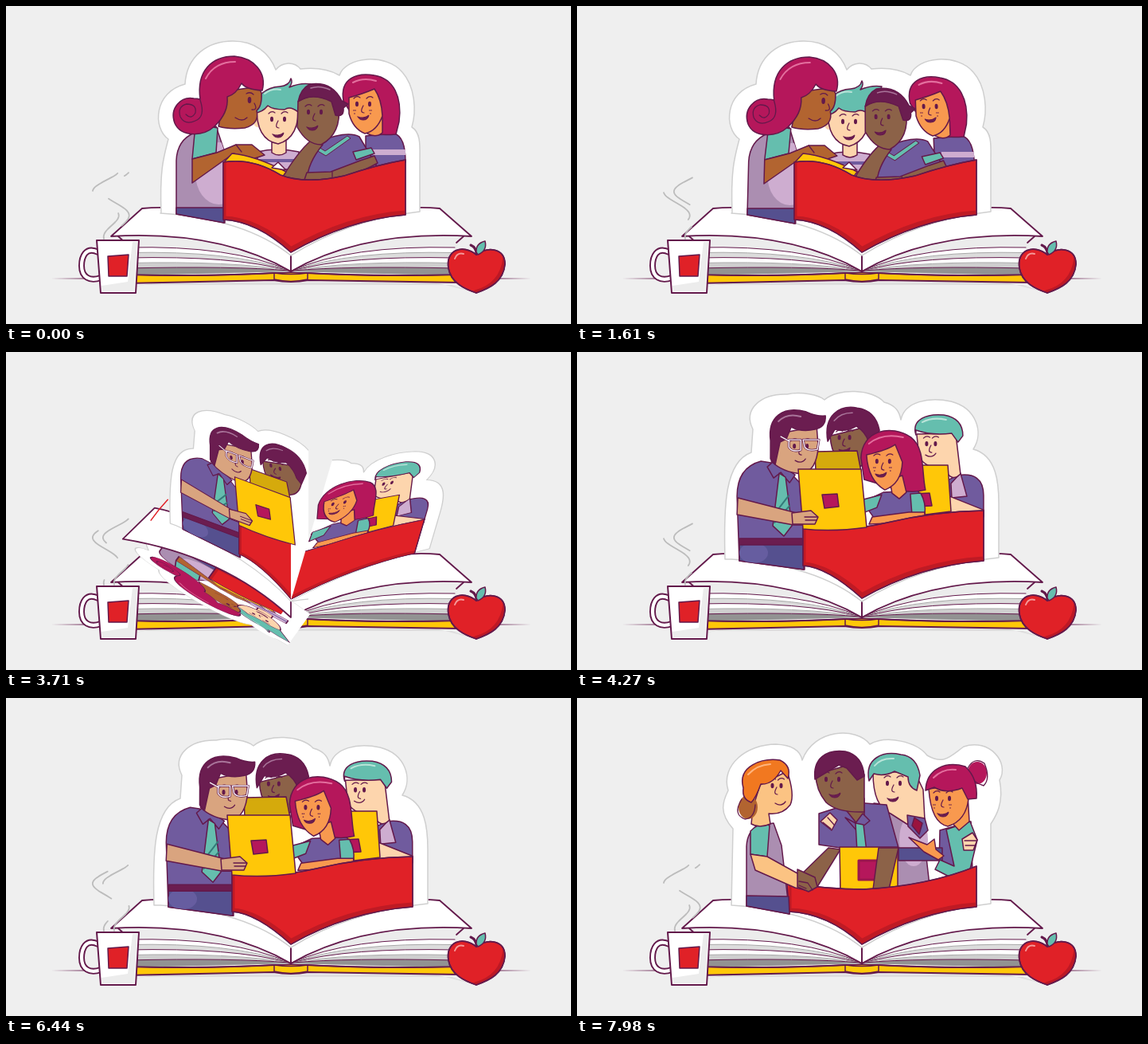
An HTML page with a canvas for the animation above (8000 ms loop, 710 by 399 pixels).

```html
<!DOCTYPE html>
<html lang="en">
<head>
<meta charset="utf-8">
<title>Pop-up book</title>
<style>
html, body { margin: 0; width: 100%; height: 100%; overflow: hidden; background: #efefef; }
canvas { display: block; width: 710px; height: 399px; }
</style>
</head>
<body>
<canvas id="stage" width="710" height="399"></canvas>
<script>
const ctx = document.getElementById('stage').getContext('2d');
const INK = '#63194b', PINK = '#b5175b', PLUM = '#6b1d50', TEAL = '#65beae', PURPLE = '#705b9e',
  INDIGO = '#55508f', LILAC = '#ceadd0', MAUVE = '#ab8eb1', RED = '#e02127', YELLOW = '#ffc708',
  BROWN = '#b26430', DARK = '#8c6248', PEACH = '#fdd5ad', ORANGE = '#f8994f', TAN = '#d9a47f';
const SPINE = [358, 312], LOOP = 8000, SCENE = 4000, TURN = 3150, TURN_KEYS = [0, 270, 560, 760];
let sway = 0, side = null;

ctx.lineJoin = ctx.lineCap = 'round';

function shape(d, fill, line = INK, width = 1.5) {
  const path = new Path2D(d);
  if (fill) { ctx.fillStyle = fill; ctx.fill(path); }
  if (line) { ctx.strokeStyle = line; ctx.lineWidth = width; ctx.stroke(path); }
}
const stroke = (d, color = INK, width = 1.3) => shape(d, null, color, width);

function dot(x, y, rx, ry = rx, color = INK) {
  ctx.fillStyle = color;
  ctx.beginPath();
  ctx.ellipse(x, y, rx, ry, 0, 0, 7);
  ctx.fill();
}

function inside(d, draw) {
  ctx.save();
  ctx.clip(new Path2D(d));
  draw();
  ctx.restore();
}

// While the pop-up folds, paper stops at the spine, but figures overhang it.
function creased(overlap, draw) {
  if (!side) draw();
  else inside(side === 'Left' ? `M0 0H${358 + overlap}V399H0Z` : 'M358 0H710V399H358Z', draw);
}

// A figure leans from its foot and dips as the sway grows.
function figure(owner, lean, dip, draw) {
  if (side && side !== owner) return;
  ctx.save();
  ctx.transform(1, 0, -lean * sway, 1, lean * sway * 260, dip * sway);
  draw();
  ctx.restore();
}

// x, y lies midway between the eyes.
function face(x, y, { gap = 16, mouth = 21, shift = 0, open = true, freckles = false } = {}) {
  for (const dir of [-1, 1]) {
    const ex = x + dir * gap / 2;
    dot(ex, y, 2, 3.2);
    stroke(`M${ex - 4} ${y - 7}q4 -4 8 -1`, INK, 1.2);
    if (freckles) for (let i = 0; i < 3; i++) dot(ex + dir * (i + 1) - 1, y + 8 + i % 2 * 4, .8);
  }
  stroke(`M${x} ${y + 2}q-5 9 1 9`, INK, 1.2);
  const mx = x + shift, my = y + mouth;
  if (open) shape(`M${mx - 7} ${my - 2}q7 3 14 -2q-1 6 -7 6q-5 0 -7 -4`, PLUM, INK, 1);
  else stroke(`M${mx - 7} ${my}q8 5 13 -2`);
}

function pocket(top, left, right) {
  const d = `${top}V262Q430 268 358 309Q315 270 ${left} 268Z`;
  creased(0, () => {
    shape(d, RED);
    inside(d, () => {
      stroke(`M${left} 268Q315 269 358 307Q430 266 ${right} 261`, '#bf1a24', 9);
      stroke(`M${left + 2} 190V270`, '#bf1a24', 3);
    });
    stroke(d);
  });
}

const cutout = d => creased(25, () => shape(d + 'V258Q430 268 358 313Q300 267 194 260Z', '#fff', '#cfcfcf', 1.5));

function family() {
  cutout('M195 260C193 205 198 190 204 167C184 153 186 108 225 98C227 63 253 44 285 44C313 44 331 59 339 80C347 70 362 69 370 79C389 77 407 80 419 87C427 63 478 59 498 83C514 101 516 131 510 152C522 159 520 178 520 195');
  figure('Left', 0, 3, () => {
    shape('M316 183Q340 177 368 183V205H316Z', LILAC);
    shape('M334 164H352V184Q343 190 334 184Z', PEACH);
    stroke('M318 194H366', PURPLE, 4);
    dot(316, 145, 5, 7, PEACH);
    shape('M315 126Q314 168 342 173Q370 165 367 123Z', PEACH);
    face(342, 142);
    shape('M312 134C311 111 329 102 344 101Q356 100 358 91Q361 96 356 102Q370 96 383 98L367 133Q357 125 350 130Q335 130 329 125Q322 134 312 134Z', TEAL);
    stroke('M325 110Q334 103 345 105', '#b9e4d9', 2);
  });
  figure('Right', -.04, 3, () => {
    shape('M452 163L488 160Q502 164 502 196L452 208Z', PURPLE);
    shape('M461 180H502V187H461Z', LILAC, null);
    shape('M424 119C419 90 442 83 463 87C487 91 498 114 494 145L490 161Q468 163 448 158Z', PINK);
    shape('M450 145L473 140V159Q465 166 454 160Z', ORANGE);
    shape('M431 115Q449 110 463 104Q472 117 473 138Q466 157 451 160Q436 154 431 135Z', ORANGE);
    face(449, 123, { mouth: 18, freckles: true });
    stroke('M436 96Q449 89 465 94', '#e36f9e', 2);
  });
  figure('Right', -.035, 6, () => {
    shape('M374 185L393 170Q429 156 444 164L466 201Q415 224 361 216Z', PURPLE);
    shape('M388 174L401 182L429 163L433 166L402 188L385 178Z', TEAL, INK, 1);
    shape('M436 183L459 178L463 185L440 193Z', TEAL);
    shape('M348 214Q367 183 383 169L398 174Q379 197 378 219Z', DARK);
    shape('M378 209L408 208L445 194L463 188L467 197Q428 220 375 218Z', DARK);
    stroke('M410 208V219');
    shape('M367 120Q383 109 408 114L418 125Q422 160 396 174Q378 174 366 152Z', DARK);
    face(388, 133, { shift: -3 });
    shape('M382 98Q410 94 422 119L430 123L424 128Q425 140 414 137L409 120Q385 108 367 120Q370 104 382 98Z', PLUM);
    stroke('M383 103Q394 99 407 105', '#a9759a', 1.5);
  });
  figure('Left', .026, 1, () => {
    const body = 'M214 261V194Q215 168 237 159L264 151L275 184V272Z';
    shape(body, MAUVE);
    inside(body, () => dot(267, 210, 29, 39, LILAC));
    shape('M214 253H274V272L214 261Z', INDIGO);
    shape('M237 160Q250 149 266 153L264 184L234 192Z', TEAL);
    shape('M234 192L265 184L289 174H309L325 187L310 192L286 185L234 222Z', BROWN);
    stroke('M289 174L296 183');
    shape('M267 151L276 107L317 101L321 109Q322 126 315 131Q319 148 300 153Q280 155 267 151Z', BROWN);
    dot(306, 118, 2.3, 4);
    stroke('M302 110q5 -3 9 1M312 122q5 9 -3 8M288 140q9 6 15 0');
    shape('M244 117C239 81 259 63 287 63C312 65 328 84 322 106Q302 105 296 97Q289 111 278 114Q280 134 262 151C248 164 220 165 212 147C205 128 220 113 236 116Q240 116 244 117Z', PINK);
    stroke('M244 118Q251 139 238 144Q225 150 219 139Q215 126 227 123Q240 123 238 134Q233 143 226 136');
    stroke('M251 91Q262 70 288 70', '#e36f9e', 2);
  });
  figure('Left', 0, 0, () => {
    shape('M284 185Q314 188 352 208L347 215Q310 196 274 196Z', YELLOW);
    shape('M334 203L342 196L352 206Z', '#fff');
  });
  pocket('M273 196Q309 190 345 212Q375 224 425 213Q467 199 502 193', 273, 502);
}

function classroom() {
  cutout('M186 260C184 192 186 138 219 126L221 97C208 71 232 52 264 53C282 49 304 54 311 60C328 45 371 46 386 63C401 67 405 75 407 85C412 62 442 56 470 62C501 70 512 100 498 122C528 130 530 166 530 190');
  figure('Left', .008, 2, () => {
    shape('M318 105L366 93L373 117Q370 142 347 146Q320 140 318 105Z', DARK);
    face(336, 107, { gap: 13, mouth: 17 });
    shape('M315 112C309 79 330 66 352 70Q375 73 380 98L373 119L366 112Q363 101 351 93Q337 101 324 97Z', PLUM);
    stroke('M323 86Q331 76 346 76', '#a9759a', 1.5);
  });
  figure('Right', -.01, 1, () => {
    shape('M441 174L477 155Q511 149 511 180V207H437Z', PURPLE);
    shape('M470 165L482 152L490 181L471 183Z', LILAC);
    shape('M438 187L466 180L511 198V206H438Z', PEACH);
    shape('M427 103L476 102L482 153Q471 164 463 148Q439 146 430 132Z', PEACH);
    face(445, 115, { gap: 11, mouth: 14, open: false });
    shape('M426 104C420 84 440 77 461 79Q485 83 485 105L479 113L471 102Q445 105 426 98Z', TEAL);
    stroke('M434 88Q447 81 464 85', '#b9e4d9', 2);
  });
  figure('Right', 0, 0, () => {
    shape('M414 148L434 142H466L470 200L414 207Z', YELLOW);
    shape('M421 178L443 177L446 193L424 194Z', PINK);
  });
  figure('Left', 0, 0, () => shape('M299 125L352 124L357 150H300Z', '#d5aa0c'));
  figure('Left', .012, 1, () => {
    const shirt = 'M204 262L201 181Q201 145 231 137L257 141L286 170V273Z';
    shape(shirt, PURPLE);
    shape('M204 239H285V273L204 262Z', INDIGO);
    inside(shirt, () => dot(222, 252, 18, 13, '#665da0'));
    shape('M204 234H285V242H204Z', PLUM);
    shape('M239 144L248 136L274 154L267 164L256 151L247 158Z', PURPLE);
    shape('M254 152L262 157L270 218L260 231L246 218Z', TEAL);
    stroke('M249 202L266 180M248 214L267 193', '#347a79', 2);
    shape('M202 183L276 202L294 198Q306 208 301 217H272L201 204Z', TAN);
    shape('M246 104L301 93L303 119Q301 148 283 153Q258 151 244 137Z', TAN);
    face(281, 118, { gap: 16, mouth: 18, open: false });
    shape('M243 111C239 81 259 67 288 75Q301 81 312 80Q313 94 299 97Q282 101 269 94L263 109L255 113L249 141L243 134Z', PLUM);
    const glasses = 'M266 110H281V123Q270 126 266 119ZM284 110H304L302 122Q290 125 286 119ZM256 106L267 112';
    stroke(glasses, INK, 2.8);
    stroke(glasses, '#f5eef3', 1.4);
    stroke('M253 87Q264 76 281 81', '#a9759a', 2);
  });
  figure('Right', -.016, 1, () => {
    shape('M359 188L385 176L428 174Q438 184 437 211L379 216Z', PURPLE);
    shape('M360 185L383 179L377 195L359 202Z', TEAL);
    shape('M419 178L432 177Q439 190 437 203L421 204Z', TEAL);
    shape('M371 207L417 201H437V213L367 216Z', ORANGE);
    shape('M357 133C358 98 395 90 420 107C438 121 433 151 438 173Q418 178 398 171L361 160Z', PINK);
    shape('M393 160L409 155L414 176L405 184L396 177Z', ORANGE);
    shape('M364 129Q390 123 400 116L409 138Q408 165 387 173Q366 161 364 129Z', ORANGE);
    face(385, 137, { mouth: 18, shift: -3, freckles: true });
    stroke('M367 115Q384 101 410 107', '#e36f9e', 2);
  });
  pocket('M284 221Q340 226 390 214Q450 200 511 199', 284, 511);
  figure('Left', 0, 0, () => {
    shape('M278 147H357L364 220Q322 226 284 222Z', YELLOW);
    shape('M308 179L327 178L329 194L311 196Z', PINK);
    shape('M270 202L294 199L303 207L299 216H271Z', TAN);
    stroke('M286 207H302M287 211H301');
  });
}

function meeting() {
  cutout('M194 260L196 164C178 144 183 130 190 116C180 84 214 58 250 58C271 59 281 67 283 78C298 38 351 36 368 58C389 46 427 55 440 72C461 84 468 74 486 61C518 50 544 81 531 103C537 132 526 149 520 158');
  figure('Right', -.015, 2, () => {
    shape('M373 132L432 139L443 235L374 242Z', MAUVE);
    dot(423, 178, 18, 33, LILAC);
    shape('M372 94L424 92L435 115L437 153L419 161L394 145Q372 136 372 94Z', PEACH);
    face(398, 107, { shift: -1 });
    shape('M367 104C361 75 385 66 407 71Q427 73 431 97L427 116Q416 112 416 99L399 92Q386 99 373 95Z', TEAL);
    stroke('M374 85Q382 75 398 76', '#b9e4d9', 2);
    shape('M415 147L437 151L441 166L431 176L416 161Z', PURPLE);
    shape('M424 150L434 157L430 171L421 160Z', '#9a143e');
  });
  figure('Left', .01, 2, () => {
    shape('M304 145L348 131L389 134L404 188H378L374 245L331 242V188L304 184Z', PURPLE);
    shape('M316 188L331 190L300 240L278 225Z', DARK);
    shape('M332 133L361 126V150L352 158Z', DARK);
    shape('M300 96L348 82L361 96V143Q327 144 313 131Q300 115 300 96Z', DARK);
    face(321, 102, { shift: 3 });
    shape('M299 102C296 76 313 64 337 67Q359 72 361 98L352 103L339 88L329 84L304 99Z', PLUM);
    shape('M337 150L350 157L359 145L368 154L352 167Z', PURPLE);
    shape('M350 157L360 159L364 193H352Z', TEAL);
    shape('M306 155L318 144L327 153L320 166Z', PEACH);
    stroke('M309 156L319 164M315 150L323 159');
  });
  figure('Left', 0, 0, () => {
    shape('M330 187H403V242H331Z', YELLOW);
    shape('M354 204H378V228H354Z', PINK, '#9b164d', 3);
    shape('M379 188H404L392 240H372Z', DARK);
  });
  figure('Right', -.01, 1, () => {
    shape('M456 166L495 155L497 219L455 212Z', PURPLE);
    shape('M404 188H459V204H404Z', INDIGO);
    shape('M464 165L494 155L503 178L489 235L450 215L456 203L474 211Z', TEAL);
    shape('M417 175L440 184L449 177L451 190L461 198L454 203L436 193Z', ORANGE);
    shape('M484 177L497 169L503 178L498 191H486Z', PEACH);
    stroke('M487 179H502M488 185H500');
    shape('M468 153L491 121L493 155L480 166Z', ORANGE);
    dot(503, 94, 12, 14, PINK);
    stroke('M491 88Q499 73 512 82Q520 101 511 110Q499 107 491 95');
    shape('M442 114L482 109L492 126Q489 154 466 161Q445 157 442 114Z', ORANGE);
    face(460, 126, { freckles: true });
    shape('M438 116C439 88 464 79 488 86Q504 101 502 126L491 127L484 113Q463 121 449 112Z', PINK);
    stroke('M448 100Q460 88 476 90', '#e36f9e', 2);
  });
  pocket('M264 232Q315 240 360 240Q440 236 502 211', 266, 502);
  figure('Left', .012, 1, () => {
    shape('M213 261V186Q214 167 228 160L247 157L257 185L267 271Z', MAUVE);
    shape('M213 248L266 249L267 271L213 261Z', INDIGO);
    shape('M218 167Q231 154 242 160L239 199L218 196Z', TEAL);
    shape('M218 196L239 199L277 220L300 231L291 242L274 238L224 216Z', '#fbc383');
    shape('M277 215L299 225L302 237L291 243L277 237Z', DARK);
    stroke('M279 230L290 232L296 241M279 235L288 239');
    shape('M221 138L230 109L264 92Q274 121 268 134Q258 147 241 145L243 158Q229 164 219 158Z', '#fbc383');
    face(251, 110, { gap: 11, mouth: 22, shift: 5, open: false });
    dot(215, 137, 12, 15, BROWN);
    stroke('M207 127Q195 146 211 152Q223 151 224 134');
    shape('M209 113C201 85 233 75 255 78Q270 85 265 101L256 91Q246 109 231 108Q225 125 219 131Q207 127 209 113Z', '#f17820');
    stroke('M215 96Q226 84 243 83', '#ffb47d', 2);
  });
}

const scenes = [family, classroom, meeting];

// Linear parts of each half's transform, and the leaf corners, at the turn keys.
const REST = [1, 0, 0, 1];
const poses = {
  outLeft: [REST, [.875, .38, .48, .12], [1.04, .58, .13, -.18], [1, .32, 0, 0]],
  outRight: [REST, [.34, -1.14, .31, .14], [-.97, -.43, .04, -.1], [-.95, -.3, 0, 0]],
  inLeft: [[-.95, .35, -.2, -.05], [-.31, 1.3, -.18, -.04], [.88, .33, 0, .78], REST],
  inRight: [[.92, -.38, -.25, -.1], [.92, -.42, -.27, -.1], [.95, -.17, -.2, .67], REST],
  leafBack: [[187, -58], [54, -205], [-171, -117], [-187, -58]],
  leafFront: [[227, -23], [76, -200], [-211, -78], [-226, -23]]
};

const mix = (a, b, u) => a + (b - a) * u;

function poseAt(name, time) {
  let i = 0;
  while (i < 2 && time > TURN_KEYS[i + 1]) i++;
  let u = Math.min(1, (time - TURN_KEYS[i]) / (TURN_KEYS[i + 1] - TURN_KEYS[i]));
  if (i === 0) u *= u;
  if (i === 2) u = 1 - (1 - u) ** 2;
  const [from, to] = [poses[name][i], poses[name][i + 1]];
  const angle = mix(Math.atan2(from[1], from[0]), Math.atan2(to[1], to[0]), u);
  const size = mix(Math.hypot(from[0], from[1]), Math.hypot(to[0], to[1]), u);
  return [size * Math.cos(angle), size * Math.sin(angle), ...from.slice(2).map((v, k) => mix(v, to[k + 2], u))];
}

function half(scene, name, time) {
  ctx.save();
  ctx.translate(...SPINE);
  ctx.transform(...poseAt(name, time), 0, 0);
  ctx.translate(-SPINE[0], -SPINE[1]);
  side = name.endsWith('Left') ? 'Left' : 'Right';
  scene();
  side = null;
  ctx.restore();
}

function leaf(back, front) {
  const [bx, by] = back, [fx, fy] = front;
  const lift = Math.abs(fx) / 7;
  ctx.save();
  ctx.translate(...SPINE);
  shape(`M0 0Q${bx * .48} ${by * .6 - lift} ${bx} ${by}L${fx} ${fy}Q${fx * .4} ${fy * .5 - lift * .6} 0 21Z`, '#fff', INK, 1.8);
  ctx.restore();
}

function pageStack() {
  shape('M144 287Q290 280 358 333L160 338Z', '#ececec', null);
  stroke('M141 289L150 297', INK, 1.8);
  ['#fff', '#dcdcdc', '#fff', '#cfcfcf', '#929292'].forEach((fill, i) => {
    const y = 303 + i * 6.5;
    shape(`M152 ${y}Q285 ${y - 3} 358 333L160 338Z`, fill, null);
    stroke(`M152 ${y}Q285 ${y - 3} 356 332`, i % 2 ? '#a9a9a9' : INK, 1);
  });
}

function book() {
  shape('M57 342L140 341H580L660 342L580 343H140Z', INK, null);
  shape('M120 360L188 347H540L595 361L560 350H175Z', '#dedede', null);
  shape('M150 337Q250 340 358 334Q460 340 572 337V347L380 344Q358 348 336 344L150 348Z', YELLOW, INK, 1.8);
  pageStack();
  ctx.save();
  ctx.translate(716, 0);
  ctx.scale(-1, 1);
  pageStack();
  ctx.restore();
  stroke('M160 337Q250 340 336 335M380 335Q460 340 560 337', INK, 1.5);
  shape('M337 335Q358 338 379 335V343Q358 348 337 343Z', YELLOW);
  leaf(poses.leafBack[3], poses.leafFront[3]);
  leaf(poses.leafBack[0], poses.leafFront[0]);
  stroke('M358 312V333', INK, 1.8);
}

function sweep(time) {
  if (time < 120 || time > 640) return;
  const u = (time - 270) / 290;
  const arc = (radius, from, to) => {
    ctx.strokeStyle = RED;
    ctx.lineWidth = 1.5;
    ctx.beginPath();
    ctx.arc(358, 333, radius, from * Math.PI / 180, to * Math.PI / 180);
    ctx.stroke();
  };
  arc(mix(226, 214, u), mix(-66, -145, u), mix(-44, -136, u));
  if (u < .6) arc(195, mix(-48, -110, u), mix(-40, -106, u));
}

function steam(t) {
  for (let strand = 0; strand < 2; strand++) {
    for (let wisp = 0; wisp < 2; wisp++) {
      const phase = (t / 1330 + .22 + strand * .15 + wisp * .5) % 1;
      const bottom = 322 - phase * 125;
      ctx.beginPath();
      for (let y = Math.min(292, bottom); y > Math.max(209, bottom - 35); y--) {
        const grow = (292 - y) / 83;
        const x = 132 + strand * 13 - grow * 9 + (9 + grow * 11) * Math.cos((y - 263) / 29 * Math.PI);
        ctx.lineTo(x, y);
      }
      ctx.strokeStyle = '#bcbcbc';
      ctx.lineWidth = 1.8;
      ctx.stroke();
    }
  }
}

function mugAndApple() {
  const handle = 'M116 309C100 301 95 315 95 326C95 340 105 346 119 341';
  stroke(handle, INK, 8);
  stroke(handle, '#fff', 4.2);
  shape('M114 294H167L163 360H119Z', '#fff', INK, 2);
  shape('M159 296H165L161 358H121L120 351L153 346Z', '#ececec', null);
  shape('M128 314L154 312L152 339H129Z', RED);
  const apple = 'M591 312C574 298 552 306 556 329C559 347 576 355 591 360C608 354 625 346 627 324C627 304 606 301 591 312Z';
  shape(apple, RED);
  inside(apple, () => stroke('M628 316Q624 351 590 360', '#bd1824', 7));
  stroke(apple, INK, 1.8);
  stroke('M564 317Q567 309 575 311', '#f69a9a', 2);
  stroke('M591 311Q591 303 584 300', INK, 3);
  shape('M591 309Q590 298 602 295Q605 307 593 312Z', TEAL);
}

function render(t) {
  const local = t % SCENE, index = Math.floor(t / SCENE), turn = local - TURN;
  const current = scenes[index], next = scenes[index + 1];
  sway = local < 3000 ? (1 - Math.cos(local / 1500 * Math.PI)) / 2 : 0;
  ctx.fillStyle = '#efefef';
  ctx.fillRect(0, 0, 710, 399);
  book();
  if (turn < 0) current();
  else if (turn >= TURN_KEYS[3]) next();
  else {
    const turningLeaf = () => leaf(poseAt('leafBack', turn), poseAt('leafFront', turn));
    if (turn < 300) {
      half(next, 'inRight', turn);
      half(next, 'inLeft', turn);
      turningLeaf();
      half(current, 'outLeft', turn);
      half(current, 'outRight', turn);
    } else {
      half(current, 'outLeft', turn);
      turningLeaf();
      half(next, 'inLeft', turn);
      half(next, 'inRight', turn);
    }
    sweep(turn);
  }
  steam(t);
  mugAndApple();
}

const start = performance.now();
function tick() {
  render((performance.now() - start) % LOOP);
  requestAnimationFrame(tick);
}
tick();
</script>
</body>
</html>
```
